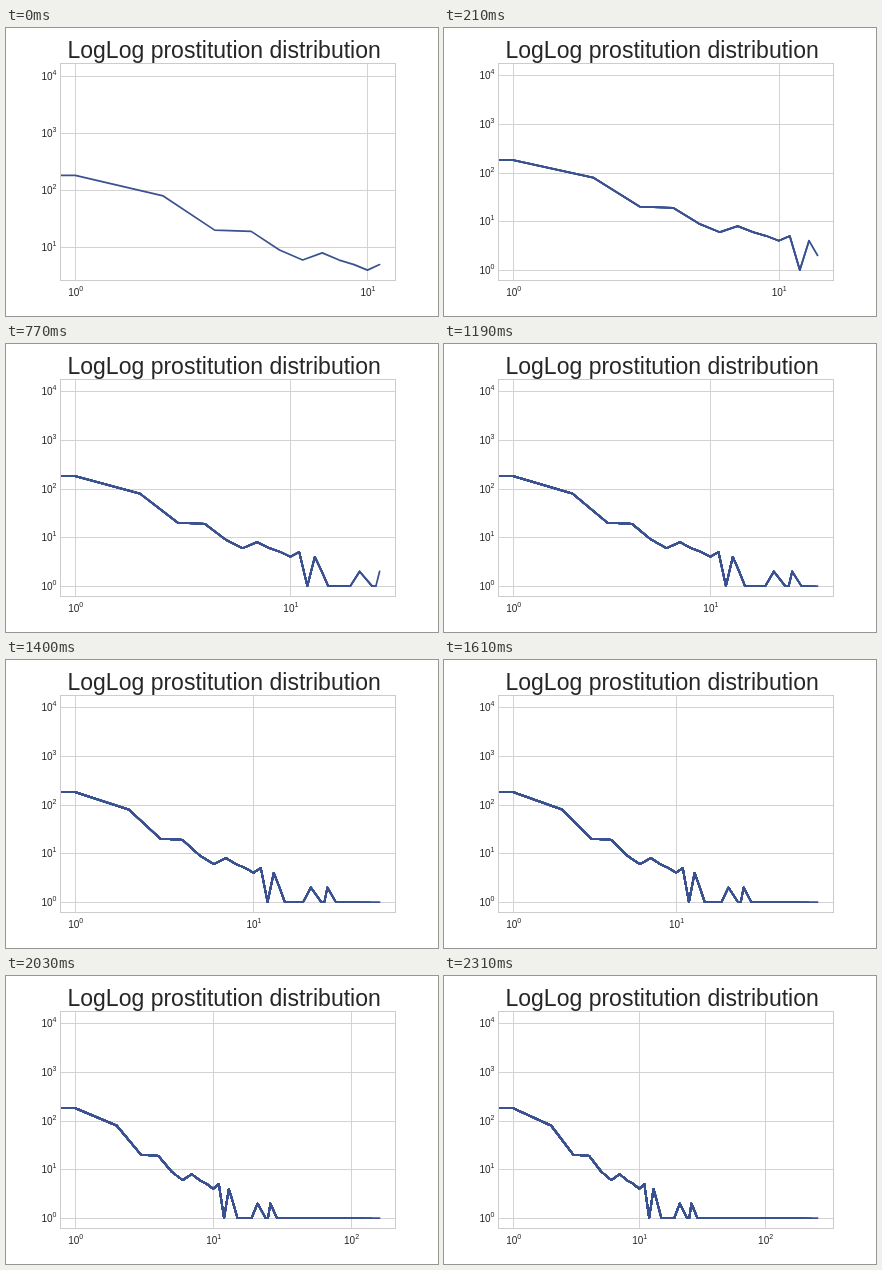
An HTML page with a canvas that plays this animation: 432x288 px, repeating every 3.08 s.

```html
<!DOCTYPE html>
<html lang="en">
<head>
<meta charset="utf-8">
<style>
  html, body { margin: 0; height: 100%; overflow: hidden; background: #fff; }
  canvas { display: block; }
</style>
</head>
<body>
<canvas id="chart" width="432" height="288"></canvas>
<script>
const ctx = document.getElementById('chart').getContext('2d');
const FONT = 'Arial, "Liberation Sans", sans-serif';
const STEP = 70, LOOP = 3080, LAST = 33;

// Axes box and the inner area that the data spans
const box = { left: 54, right: 389, top: 35, bottom: 252 };
const area = { left: 69.22, right: 373.58, top: 44.44, bottom: 242.12 };
const TOP_LOG = 4.055;

// [step, largest x]: geometric growth in between
const growth = [[0, 11], [6, 17], [9, 24], [11, 26], [12, 29], [17, 35],
  [23, 74], [29, 161], [LAST, 261]];
const head = [180, 79, 20, 19, 9, 6, 8, 6, 5, 4, 5, 1, 4, 2];
const pairs = [21, 26];

function maxAt(step) {
  const i = Math.max(1, growth.findIndex(([s]) => s >= step));
  const [s0, x0] = growth[i - 1], [s1, x1] = growth[i];
  return Math.round(x0 * (x1 / x0) ** ((step - s0) / (s1 - s0)));
}

const countAt = x => head[x - 1] || (pairs.includes(x) ? 2 : 1);
const snap = v => Math.round(v) + 0.5;

const points = [];
function addPoint(x) {
  points.push([Math.log10(x), Math.log10(countAt(x))]);
}
for (let x = 1; x < maxAt(0); x++) addPoint(x);
const FIRST = points.length + 1;
for (let s = 0; s <= LAST; s++) addPoint(maxAt(s));

function segment(x1, y1, x2, y2) {
  ctx.beginPath();
  ctx.moveTo(x1, y1);
  ctx.lineTo(x2, y2);
  ctx.stroke();
}

function power(exp, x, baseline) {
  ctx.font = '10px ' + FONT;
  ctx.fillText('10', x, baseline);
  ctx.font = '7px ' + FONT;
  ctx.fillText(exp, x + 11.1, baseline - 4.6);
}

function draw(step) {
  const n = FIRST + step;
  const xUnit = (area.right - area.left) / points[n - 1][0];
  const low = step ? 0 : Math.log10(4);
  const yUnit = (area.bottom - area.top) / (TOP_LOG - low);
  const px = log => area.left + log * xUnit;
  const py = log => area.bottom - (log - low) * yUnit;

  ctx.fillStyle = '#fff';
  ctx.fillRect(0, 0, 432, 288);
  ctx.fillStyle = '#262626';
  ctx.font = '23px ' + FONT;
  ctx.fillText('LogLog prostitution distribution', 61.5, 30);

  ctx.strokeStyle = '#d3d3d3';
  ctx.lineWidth = 1;
  for (let e = 0; px(e) <= box.right; e++) {
    const x = snap(px(e));
    segment(x, box.top, x, box.bottom);
    power(e, px(e) - 7, 268);
  }
  for (let e = Math.ceil(low); e <= 4; e++) {
    const y = snap(py(e));
    segment(box.left, y, box.right, y);
    power(e, 35.5, Math.round(py(e)) + 4);
  }

  // Every step adds a longer curve over the earlier ones
  ctx.save();
  ctx.beginPath();
  ctx.rect(box.left, box.top, box.right - box.left, box.bottom - box.top);
  ctx.clip();
  ctx.strokeStyle = '#3a528f';
  ctx.lineWidth = 1.75;
  ctx.lineJoin = ctx.lineCap = 'round';
  for (let end = FIRST; end <= n; end++) {
    ctx.beginPath();
    ctx.moveTo(0, py(points[0][1]));
    for (const [x, y] of points.slice(0, end)) ctx.lineTo(px(x), py(y));
    ctx.stroke();
  }
  ctx.restore();

  ctx.strokeStyle = '#ccc';
  ctx.strokeRect(box.left + 0.5, box.top + 0.5,
    box.right - box.left, box.bottom - box.top);
}

const start = performance.now();
function tick() {
  const t = (performance.now() - start) % LOOP;
  draw(Math.min(LAST, Math.floor(t / STEP)));
  requestAnimationFrame(tick);
}
tick();
</script>
</body>
</html>
```
